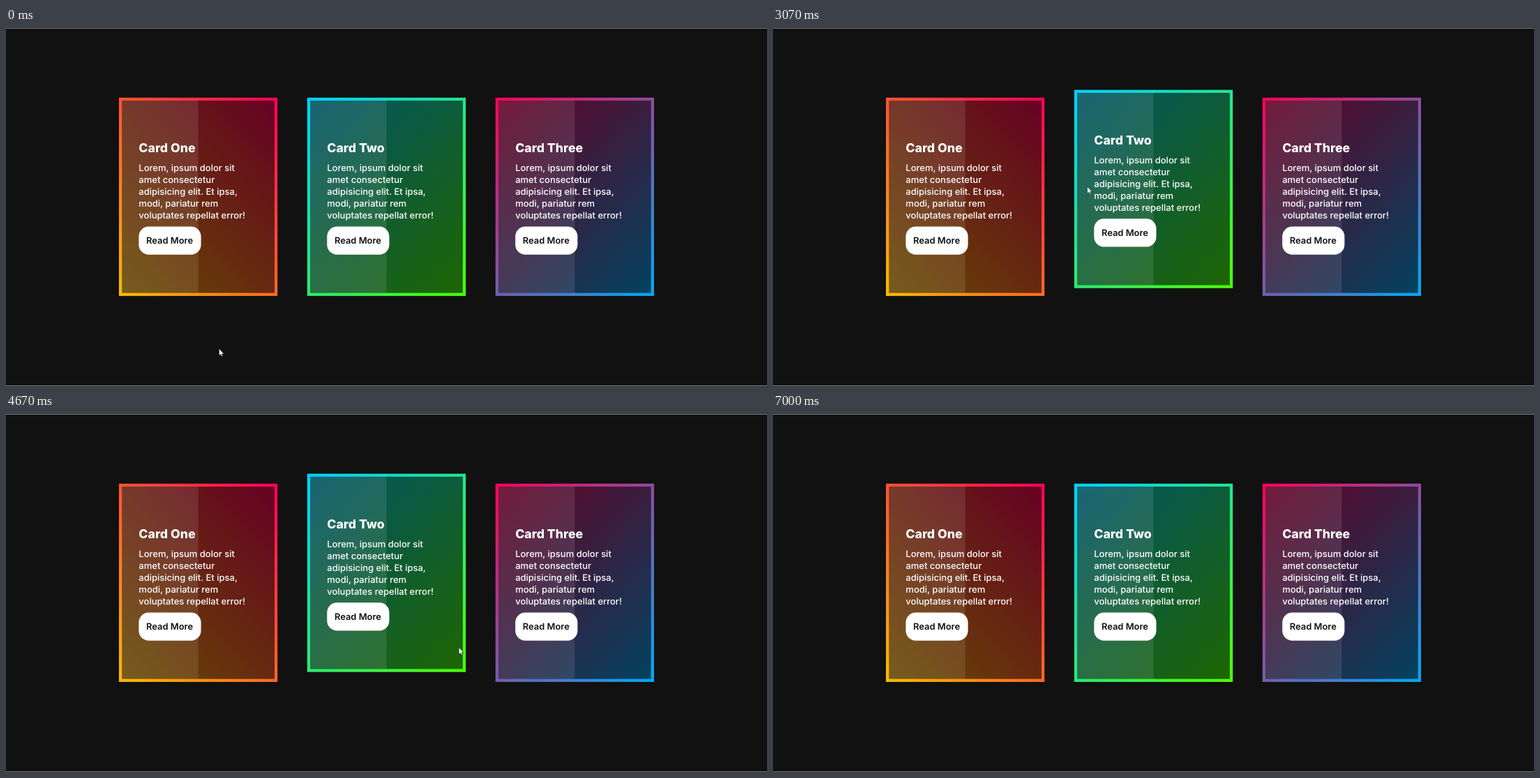
An HTML page for the animation above (8.34 s loop, 1091 by 513 pixels).

```html
<!DOCTYPE html>
<html lang="en">
<head>
<meta charset="utf-8">
<title>Gradient cards</title>
<style>
  html, body { margin: 0; width: 100%; height: 100%; overflow: hidden; background: #111; }
  svg { position: absolute; left: 0; top: 0; }
  text { font: 500 18.3px Inter, "Open Sans", sans-serif; fill: #fff; text-rendering: geometricPrecision; }
  .title { font-size: 24.9px; font-weight: 800; }
  .label { font-size: 18.2px; font-weight: 600; fill: #111; }
</style>
</head>
<body>
<svg width="1091" height="513">
  <rect width="1091" height="513" fill="#111"/>
  <path d="M0 .5H1091M0 512.5H1091" stroke="#777"/>
  <g id="cards"></g>
  <g id="cursor">
    <path id="arrow" d="M0 0V10L2.3 8L3.8 11.2L5.3 10.5L3.9 7.4H6.9Z" fill="#fff" stroke="#000" stroke-width=".5"/>
    <path id="beam" d="M-1.5-4H1.5M0-4V4M-1.5 4H1.5" fill="none" stroke="#aaa" stroke-width=".8"/>
  </g>
</svg>
<script>
const LOOP = 8340, FPS = 15, GONE = 6990;
// cards are laid out on a 1536 px wide page, shown scaled down
const SCALE = 1091 / 1536;
const W = 320, H = 400, TOP = 140.5, LEFT = 228, PITCH = 380, BORDER = 6;
const RISE = 20, EASE_MS = 500;

const CARDS = [
  { title: "Card One", from: "#ffbc00", to: "#ff0058", dir: 1 },
  { title: "Card Two", from: "#4dff03", to: "#00d0ff", dir: -1 },
  { title: "Card Three", from: "#03a9f4", to: "#ff0058", dir: -1 }
];
const LINES = ["Lorem, ipsum dolor sit", "amet consectetur", "adipisicing elit. Et ipsa,",
  "modi, pariatur rem", "voluptates repellat error!"];

// turning points of the pointer: time, x, y
const PATH = [
  [0, 305.5, 459.5], [267, 300, 432], [1000, 291, 381], [2200, 322, 262],
  [2800, 430, 372], [3067, 450.5, 227], [3500, 365, 200], [3800, 381, 190],
  [3863, 432, 182], [4000, 472, 171], [4820, 690, 372], [5200, 765, 236],
  [5600, 840, 260], [6400, 690, 440], [6940, 500, 497]
];

const $ = id => document.getElementById(id);
const mix = (a, b, k) => a + (b - a) * k;

function pointerAt(t) {
  const i = PATH.findIndex(p => p[0] > t);
  if (i < 0) return PATH[PATH.length - 1].slice(1);
  const [t0, x0, y0] = PATH[i - 1], [t1, x1, y1] = PATH[i];
  const k = (t - t0) / (t1 - t0);
  return [mix(x0, x1, k), mix(y0, y1, k)];
}

// cubic-bezier(.25, .1, .25, 1), solved by bisection
function ease(p) {
  if (p >= 1) return 1;
  const curve = (a, b, s) => 3 * a * s * (1 - s) ** 2 + 3 * b * s * s * (1 - s) + s ** 3;
  let lo = 0, hi = 1;
  for (let i = 0; i < 20; i++) {
    const mid = (lo + hi) / 2;
    if (curve(.25, .25, mid) < p) lo = mid; else hi = mid;
  }
  return curve(.1, 1, lo);
}

// pointer position in a card's own coordinates
function local(card, t) {
  const [x, y] = pointerAt(t);
  return [x / SCALE - card.x, y / SCALE - TOP];
}

function hovered(card, t) {
  const [x, y] = local(card, t);
  return x > 0 && x < W && y > 0 && y < H;
}

function overText(card, t) {
  const [x, y] = local(card, t);
  return x > 40 && x < 280 && y > 70 && y < 240;
}

function liftAt(card, t) {
  const move = card.moves.filter(m => m.start <= t).pop();
  return move ? mix(move.from, move.to, ease((t - move.start) / EASE_MS)) : 0;
}

// each time the pointer crosses a card's edge, a new transition starts
function findMoves(card) {
  card.moves = [];
  let inside = false;
  for (let t = 0; t < GONE; t += 2) {
    if (hovered(card, t) === inside) continue;
    inside = !inside;
    card.moves.push({ start: t, from: liftAt(card, t), to: inside ? RISE : 0 });
  }
}

function build(card, i) {
  card.x = LEFT + PITCH * i;
  const reach = (W + H) / 4, dx = reach * card.dir;
  const body = LINES.map((s, n) => `<text x="40" y="${148 + 24 * n}">${s}</text>`).join("");
  card.el = document.createElementNS("http://www.w3.org/2000/svg", "g");
  card.el.innerHTML = `
    <linearGradient id="fill${i}" gradientUnits="userSpaceOnUse"
      x1="${W / 2 - dx}" y1="${H / 2 + reach}" x2="${W / 2 + dx}" y2="${H / 2 - reach}">
      <stop stop-color="${card.from}"/><stop offset="1" stop-color="${card.to}"/>
    </linearGradient>
    <rect width="${W}" height="${H}" fill="url(#fill${i})"/>
    <rect x="${BORDER}" y="${BORDER}" width="${W - 2 * BORDER}" height="${H - 2 * BORDER}" fill="#000" opacity=".6"/>
    <rect x="${BORDER}" y="${BORDER}" width="${W / 2 - BORDER}" height="${H - 2 * BORDER}" fill="#fff" opacity=".1"/>
    <text class="title" x="40" y="110">${card.title}</text>${body}
    <rect x="40" y="260" width="125.6" height="56.6" rx="20" fill="#fff"/>
    <text class="label" x="55" y="294.6">Read More</text>`;
  $("cards").append(card.el);
  findMoves(card);
}

function draw(now) {
  // the picture advances in even steps
  const t = Math.floor((now % LOOP) * FPS / 1000 + .06) * 1000 / FPS;
  for (const card of CARDS)
    card.el.setAttribute("transform", `translate(${card.x} ${TOP - liftAt(card, t)})`);
  const text = CARDS.some(card => overText(card, t));
  $("cursor").setAttribute("transform", `translate(${pointerAt(t)})`);
  $("cursor").style.display = t < GONE ? "" : "none";
  $("arrow").style.display = text ? "none" : "";
  $("beam").style.display = text ? "" : "none";
}

$("cards").setAttribute("transform", `scale(${SCALE})`);
CARDS.forEach(build);

const start = performance.now();
function tick() {
  draw(performance.now() - start);
  requestAnimationFrame(tick);
}
tick();
</script>
</body>
</html>
```
